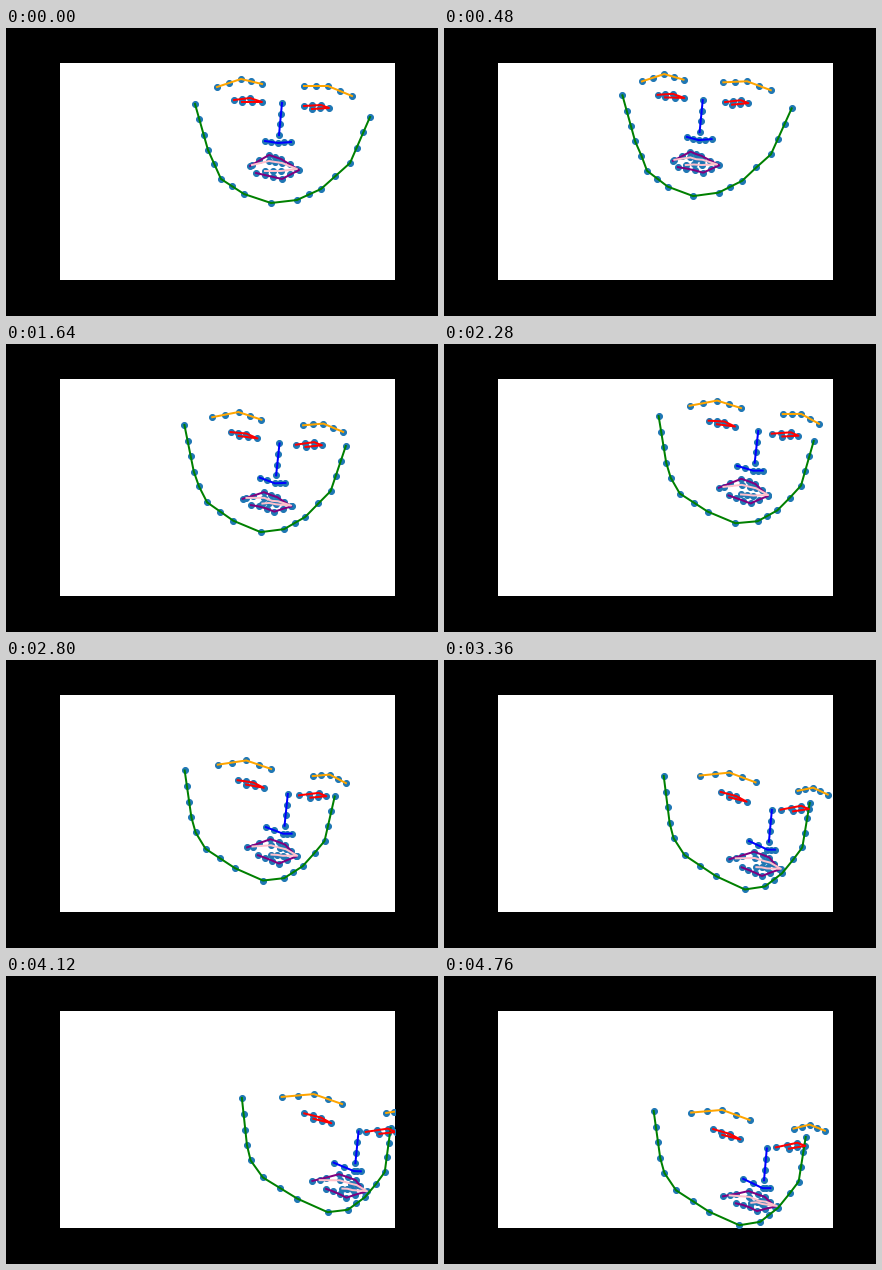
These frames come from a looping animation (432 px wide and 288 px high, 4800 ms). A matplotlib script:

```python
import numpy as np
import matplotlib.pyplot as plt
from matplotlib.animation import FuncAnimation

W, H, DPI = 432, 288, 72
FRAMES, STEP = 120, 40
CENTER, HALF = np.array([276.5, 85]), 87.5   # head middle and half width

parts = []


def spread(knots, n):
    """Spread a few values evenly over n points."""
    return np.interp(np.linspace(0, 1, n), np.linspace(0, 1, len(knots)), knots)


def part(color, at, points, turn, nod, ring=False):
    """Line through key points placed at the given indices.

    turn and nod say how far it sticks out, so how much it follows the head.
    """
    n = at[-1] + 1
    if len(points) < len(at):
        raise ValueError("one point per index")
    xy = np.column_stack([np.interp(range(n), at, c) for c in zip(*points)])
    close = np.sin(2 * np.pi * np.arange(n) / n) * ring
    parts.append((color, xy, spread(turn, n), spread(nod, n), close))


# Jaw, brows, nose, eyes, lips
part("green", [0, 3, 5, 7, 8, 9, 11, 13, 16],
     [(189, 76), (202, 122), (215, 151), (238, 166), (265, 175),
      (291, 172), (315, 161), (344, 135), (364, 89)],
     turn=[0, -.05, .72, .5, 0], nod=[0, 0, .3, 0, 0])
part("orange", [0, 2, 4], [(211, 59), (235, 51), (256, 56)],
     turn=[.46, .97], nod=[.53, .75])
part("orange", [0, 2, 4], [(298, 58), (322, 58), (346, 68)],
     turn=[1.17, .9], nod=[.86, .5])
part("blue", [0, 3], [(276, 75), (273, 107)], turn=[1, 1.06], nod=[1])
part("blue", [0, 2, 4], [(259, 113), (272, 115), (285, 114)],
     turn=[.84, 1.06, .96], nod=[.8, 1, 1])
part("red", [0, 2, 3, 5], [(228, 72), (244, 70), (256, 74), (236, 74)],
     turn=[.68, .76, .74], nod=[.6, .82, .7])
part("red", [0, 2, 3, 5], [(298, 78), (315, 77), (323, 80), (306, 81)],
     turn=[.73, .95, .9], nod=[.82, .63, .75])
part("purple", [0, 2, 4, 6, 8, 11],
     [(244, 138), (263, 127), (275, 131), (293, 142), (276, 151), (250, 145)],
     turn=[.7, 1.1, .88, .92], nod=[.6, .65, .7, .65], ring=True)
part("pink", [0, 1, 3, 4, 5, 7],
     [(246, 137), (263, 133), (276, 135), (291, 141), (275, 143), (259, 143)],
     turn=[.83, 1.12, 1.02, 1.12], nod=[.6, .7, .7, .7], ring=True)

colors, shapes, turns, nods, closes = zip(*parts)
rest = np.vstack(shapes)
turn_depth, nod_depth, lip = map(np.concatenate, (turns, nods, closes))
u, v = ((rest - CENTER) / HALF).T

# Head motion: ms, x, y, turn, squeeze, tilt, nod, lips shut
MOTION = np.array([
    (0, 0, 0, 0, 0, 0, 0, 0),
    (500, -14, -9, -4, 3, 0, 6, 2),
    (960, -30, 10.5, -7, 5.5, .5, 12, 4),
    (1240, -35, 22, 2, 6, 2, 13, 4),
    (1640, -17.5, 9, 14.5, 6.5, 4, 15.5, 3.5),
    (2280, 15.5, 2, 22, 9.5, 6, 10, .5),
    (2800, -23, 41, 28, 12, 6.5, 18, 1),
    (3360, 16, 47, 35, 14, 7, 28, 1.5),
    (4120, 33.5, 54.5, 42, 12.5, 8.5, 26, 2),
    (4480, 20, 69, 39, 12, 7.5, 29, 3),
    (4760, 9, 65.5, 37, 11, 6.5, 32, 4),
])


def landmarks(ms):
    x, y, turn, squeeze, tilt, nod, shut = (
        np.interp(ms, MOTION[:, 0], track) for track in MOTION.T[1:])
    dx = x + turn * turn_depth - squeeze * u - tilt * v
    dy = y + nod * nod_depth + tilt * u + shut * lip
    return rest + np.column_stack([dx, dy])


fig = plt.figure(figsize=(W / DPI, H / DPI), dpi=DPI, facecolor="black")
ax = fig.add_axes([0.125, 0.125, 0.775, 0.755], facecolor="white")
ax.set(xticks=[], yticks=[])
ax.spines[:].set_visible(False)

dots = ax.scatter([], [], s=36, color="#1f77b4", zorder=1)
lines = [ax.plot([], [], color=c, lw=2, zorder=2)[0] for c in colors]
cuts = np.cumsum([len(s) for s in shapes])[:-1]

# Data units are stage pixels, y pointing down
ax.set_xlim(0.125 * W, 0.9 * W)
ax.set_ylim(0.875 * H, 0.12 * H)


def draw(frame):
    points = landmarks(frame * STEP)
    dots.set_offsets(points)
    for line, piece in zip(lines, np.split(points, cuts)):
        line.set_data(piece[:, 0], piece[:, 1])
    return [dots, *lines]


anim = FuncAnimation(fig, draw, frames=FRAMES, interval=STEP, repeat=True,
                     repeat_delay=0, blit=False)
plt.show()
```
